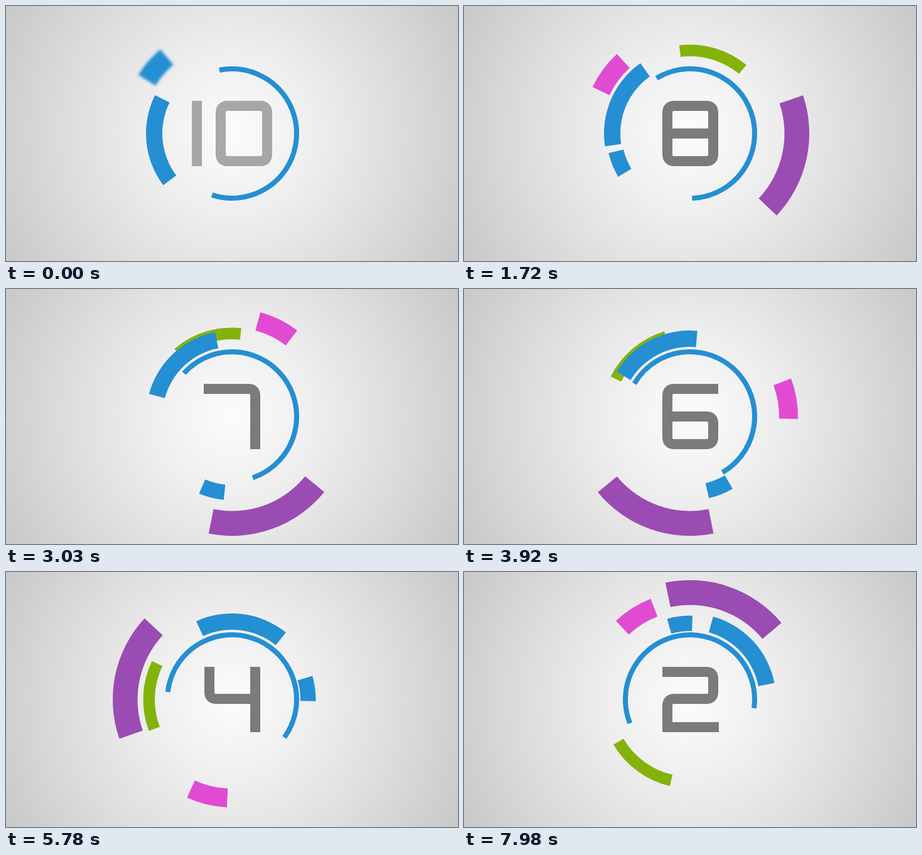
Animation of 720x406 px, one loop 8 s. Source, as an HTML page with a canvas:

```html
<!DOCTYPE html>
<html lang="en">
<head>
<meta charset="utf-8">
<title>Countdown</title>
<style>
  html, body { margin: 0; width: 100%; height: 100%; overflow: hidden; background: #ccc; }
  canvas { display: block; width: 720px; height: 406px; }
</style>
</head>
<body>
<canvas id="stage" width="720" height="406"></canvas>
<script>
const ctx = document.getElementById('stage').getContext('2d');
const LOOP = 8000, CX = 360, CY = 203;
const BLUE = '#248fd2';

// Angles in degrees, clockwise from the right, given at SYNC seconds; speed in degrees per second.
const SYNC = 0.83;
const arcs = [
  { inner: 142,   outer: 172,   from: 151.2, span: 21.9,  speed: 60.9,   color: '#e04bd2', enter: 0.17 },
  { inner: 150.5, outer: 190,   from: 302,   span: 62,    speed: 44.2,   color: '#9a4cb2', enter: 0.28 },
  { inner: 123,   outer: 141.5, from: 285.8, span: 46.4,  speed: -25.55, color: '#84b20a', enter: 0.17 },
  { inner: 111,   outer: 137,   from: 155.1, span: 63.4,  speed: 18.25,  color: BLUE },
  { inner: 109,   outer: 133.5, from: 185.2, span: 17.5,  speed: -40.7,  color: BLUE, enter: 0 },
  { inner: 99,    outer: 107,   from: 250.3, span: 209.3, speed: -12.85, color: BLUE }
];
const ENTER_TIME = 0.3;

// Centre lines of the numerals, counting down from 10.
const numerals = [
  'M304 151V255M353 159H405q11 0 11 11V236q0 11-11 11H353q-11 0-11-11V170q0-11 11-11Z',
  'M316 247H386q11 0 11-11V170q0-11-11-11H335q-11 0-11 11V191q0 11 11 11H397',
  'M335 159H386q11 0 11 11V236q0 11-11 11H335q-11 0-11-11V170q0-11 11-11ZM324 203H397',
  'M315 159H386q11 0 11 11V255',
  'M405 159H335q-11 0-11 11V236q0 11 11 11H386q11 0 11-11V214q0-11-11-11H324',
  'M406 159H324V191q0 11 11 11H386q11 0 11 11V236q0 11-11 11H316',
  'M324 151V191q0 11 11 11H397M397 151V255',
  'M316 159H386q11 0 11 11V236q0 11-11 11H316M316 203H397',
  'M316 159H386q11 0 11 11V191q0 11-11 11H335q-11 0-11 11V247H406'
].map(d => new Path2D(d));
const FIRST_CHANGE = 620;

const backdrop = ctx.createRadialGradient(CX, CY, 0, CX, CY, 414);
backdrop.addColorStop(0, '#fcfcfc');
backdrop.addColorStop(0.3, '#efefef');
backdrop.addColorStop(0.6, '#dfdfdf');
backdrop.addColorStop(1, '#c8c8c8');

const clamp01 = v => Math.min(1, Math.max(0, v));
const radians = deg => deg * Math.PI / 180;

function drawArc(arc, time) {
  let scale = 1;
  if (arc.enter !== undefined) {
    const progress = clamp01((time - arc.enter) / ENTER_TIME);
    if (progress === 0) return;
    scale += 4 * (1 - progress) ** 3;
  }
  const start = radians(arc.from + arc.speed * (time - SYNC));
  const end = start + radians(arc.span);
  const blur = Math.min(6, 7 * (scale - 1));
  ctx.filter = blur > 0.1 ? `blur(${blur}px)` : 'none';
  ctx.fillStyle = arc.color;
  ctx.beginPath();
  ctx.arc(CX, CY, arc.outer * scale, start, end);
  ctx.arc(CX, CY, arc.inner * scale, end, start, true);
  ctx.fill();
  ctx.filter = 'none';
}

function drawNumeral(ms) {
  const index = Math.max(0, Math.floor((ms - FIRST_CHANGE) / 1000) + 1);
  ctx.globalAlpha = clamp01(0.64 + ms / 550);
  ctx.strokeStyle = '#7b7b7b';
  ctx.lineWidth = 16;
  ctx.stroke(numerals[index]);
  ctx.globalAlpha = 1;
}

function render(now) {
  const ms = now % LOOP;
  const seconds = ms / 1000;
  // The opening moves a little slower than the rest.
  const time = seconds < SYNC ? 0.17 + seconds * (SYNC - 0.17) / SYNC : seconds;
  ctx.fillStyle = backdrop;
  ctx.fillRect(0, 0, 720, 406);
  arcs.forEach(arc => drawArc(arc, time));
  drawNumeral(ms);
}

function tick() {
  render(performance.now());
  requestAnimationFrame(tick);
}
tick();
</script>
</body>
</html>
```
